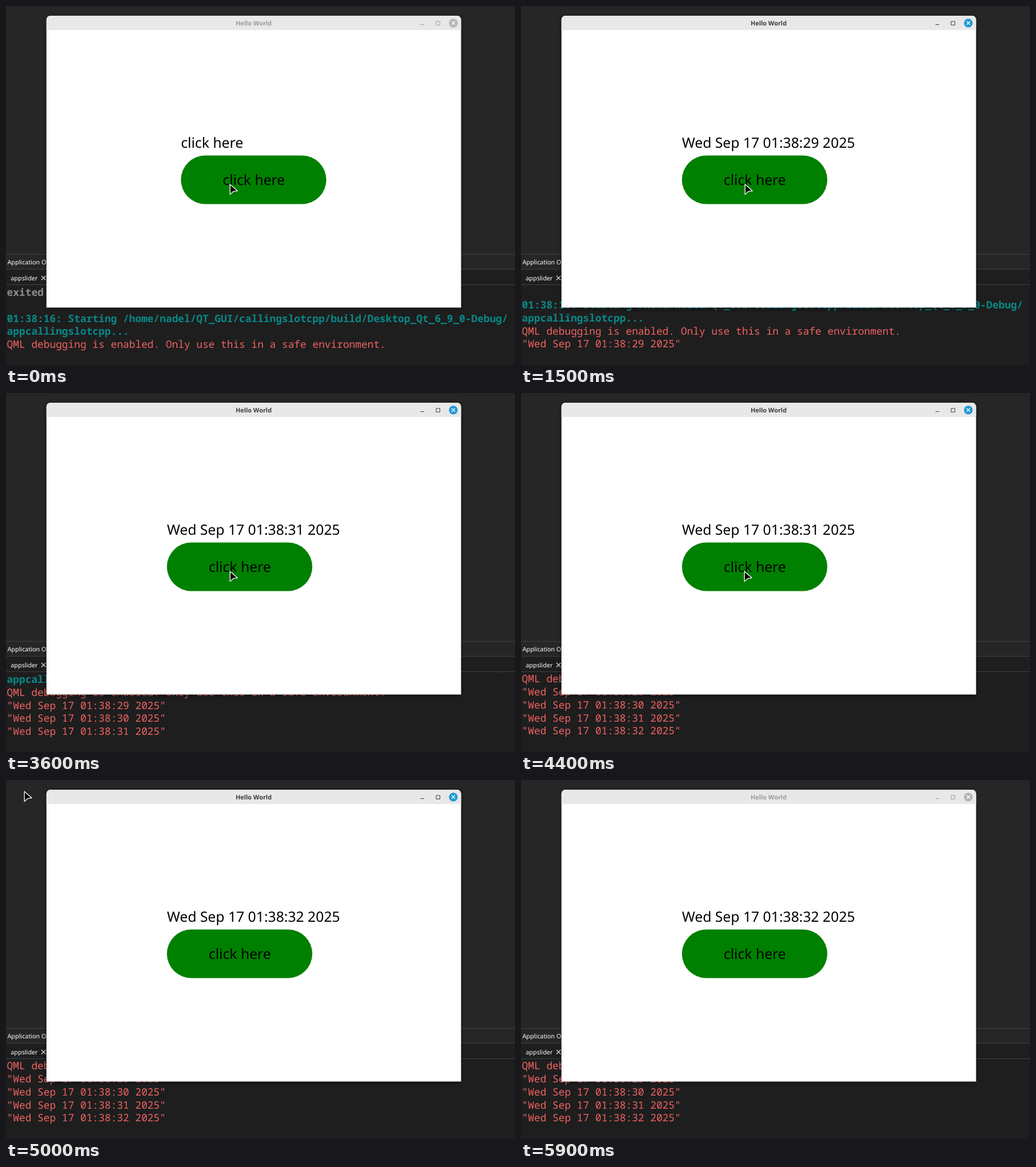
Animation, 891 px wide and 628 px high, one loop 6 s. Source, as an HTML page:

```html
<!DOCTYPE html>
<html lang="en">
<head>
<meta charset="utf-8">
<title>Hello World</title>
<style>
  html, body { margin: 0; width: 100%; height: 100%; overflow: hidden; background: #262626; }
  svg { display: block; width: 891px; height: 628px; font-family: "Noto Sans", "Open Sans", sans-serif; }
  text { white-space: pre; text-rendering: geometricPrecision; }
  #log text { font: 17.83px "Noto Sans Mono", "DejaVu Sans Mono", monospace; }
  #log .cmd { font-weight: 700; fill: #088886; }
  #log .old { font-weight: 700; fill: #8c8c8c; }
  #log .err { fill: #f06262; }
  .ui { font-size: 10.8px; fill: #fff; }
  #win { --ink: #3c3c3c; --close: #1e9ad6; --shade: .55; }
  #win.idle { --ink: #9c9c9c; --close: #b4b4b4; --shade: .25; }
  #shadow { opacity: var(--shade); }
  #caption { font-size: 10.9px; font-weight: 700; fill: var(--ink); }
  .mark { fill: none; stroke: var(--ink); }
  #close { fill: var(--close); }
  #column text { font-size: 24.72px; }
</style>
</head>
<body>
<svg viewBox="0 0 891 628">
  <defs>
    <filter id="blur" x="-5%" y="-5%" width="110%" height="110%"><feGaussianBlur stdDeviation="3"/></filter>
    <clipPath id="pane"><rect y="488" width="891" height="140"/></clipPath>
  </defs>
  <rect width="891" height="628" fill="#262626"/>
  <rect y="461" width="891" height="167" fill="#1e1e1e"/>
  <path d="M0 434.5H891M0 460.5H891M0 487.5H891" stroke="#414141"/>
  <text class="ui" x="2.4" y="452.3">Application O</text>
  <text class="ui" x="8.3" y="479.6">appslider</text>
  <path d="M62 472l7.5 7.5M69.5 472l-7.5 7.5" stroke="#e4e4e4" stroke-width="1.2"/>
  <g id="log" clip-path="url(#pane)"></g>

  <g id="win">
    <rect id="shadow" x="70" y="18" width="727" height="512" rx="8" filter="url(#blur)"/>
    <path d="M70.8 527.5V24a7 7 0 0 1 7-7H789.6a7 7 0 0 1 7 7V527.5Z" fill="#fff"/>
    <path d="M70.8 42V24a7 7 0 0 1 7-7H789.6a7 7 0 0 1 7 7V42Z" fill="#e8e8e8"/>
    <text id="caption" x="433.5" y="34" text-anchor="middle">Hello World</text>
    <path class="mark" d="M725.5 32.5h6.5M753 27h6.5v6.3h-6.5z"/>
    <circle id="close" cx="783" cy="29.8" r="7.6"/>
    <path d="M780 26.8l6 6M786 26.8l-6 6" stroke="#fff" stroke-width="1.3"/>
    <g id="column">
      <text id="label" y="248"></text>
      <rect y="261.5" width="254.5" height="85" rx="42.5" fill="#008000"/>
      <text x="127.6" y="313" text-anchor="middle">click here</text>
    </g>
  </g>
  <path id="cursor" d="M1.2 1L14.2 12.4L6.9 13.4L1.2 18.5Z" fill="#000" stroke="#fff" stroke-width="1.3" stroke-linejoin="round"/>
</svg>
<script>
  const LOOP = 6000, PITCH = 22.85;
  const $ = id => document.getElementById(id);
  const stamp = s => `Wed Sep 17 01:38:${s} 2025`;

  const lines = [
    ['old', 'exited'],
    ['old', ''],
    ['cmd', '01:38:16: Starting /home/nadel/QT_GUI/callingslotcpp/build/Desktop_Qt_6_9_0-Debug/'],
    ['cmd', 'appcallingslotcpp...'],
    ['err', 'QML debugging is enabled. Only use this in a safe environment.'],
    ...[29, 30, 31, 32].map(s => ['err', `"${stamp(s)}"`])
  ];
  const rows = lines.map(([kind, str]) => {
    const el = document.createElementNS('http://www.w3.org/2000/svg', 'text');
    el.setAttribute('class', kind);
    el.setAttribute('x', 1.6);
    el.textContent = str;
    return $('log').appendChild(el);
  });

  // start time, stamps printed, seconds on the label, baseline of the last row
  const steps = [
    [0, 0, 0, 598.3],
    [1500, 1, 29, 597.4],
    [2800, 2, 30, 597.4],
    [3600, 3, 31, 598.3],
    [4400, 4, 31, 597.4],
    [4500, 4, 32, 597.4]
  ];
  // pointer leaving through the top edge
  const exit = [[31, 19], [33, 12], [30, 2], [25, -9]];

  function pointer(t) {
    if (t < 3800) return [391, 311];
    if (t < 4500) return [390, 311];
    if (t < 5000) {
      const k = Math.floor((t - 4500) / 100) / 5;
      const e = k * k * (3 - 2 * k);
      return [390 - 359 * e, 311 - 292 * e];
    }
    return exit[Math.floor((t - 5000) / 100)] || [25, -40];
  }

  const move = (el, x, y) => el.setAttribute('transform', `translate(${x} ${y})`);
  let shown = null;

  function draw() {
    const t = performance.now() % LOOP;
    const step = steps.findLast(s => t >= s[0]);
    if (step !== shown) {
      const [, count, sec, base] = shown = step;
      const last = 4 + count;
      rows.forEach((row, i) => {
        row.setAttribute('y', base - (last - i) * PITCH);
        row.style.display = i <= last ? '' : 'none';
      });
      $('label').textContent = sec ? stamp(sec) : 'click here';
      move($('column'), sec ? 281.7 : 306.2, 0);
    }
    $('win').classList.toggle('idle', t < 1300 || t >= 5900);
    move($('cursor'), ...pointer(t));
    requestAnimationFrame(draw);
  }
  draw();
</script>
</body>
</html>
```
